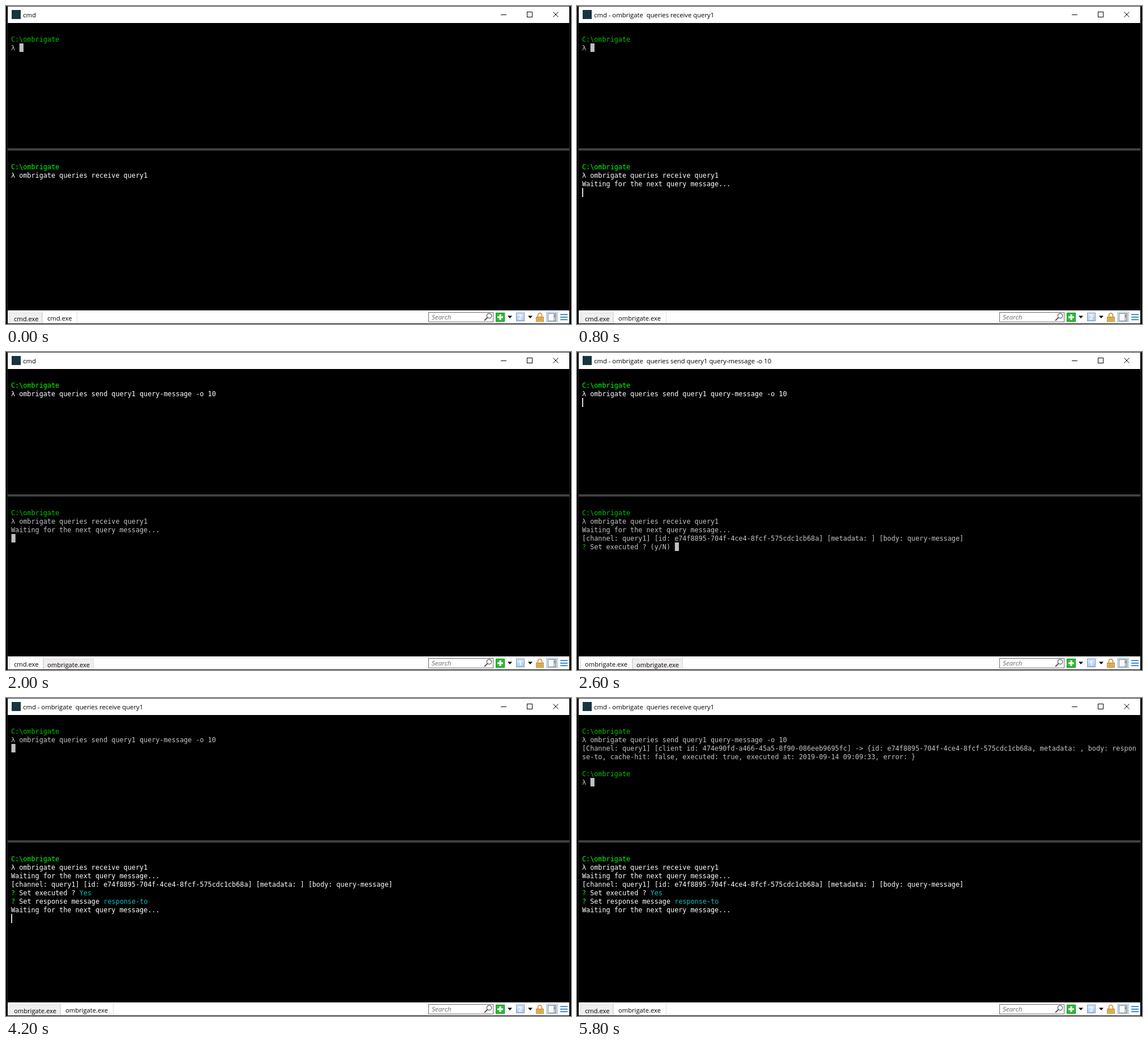
An HTML page with a canvas for the animation above (6 s loop, 998 by 561 pixels).

```html
<!DOCTYPE html>
<html lang="en">
<head>
<meta charset="utf-8">
<title>Terminal</title>
<style>
html, body { margin: 0; width: 100%; height: 100%; overflow: hidden; background: #000; }
canvas { display: block; width: 998px; height: 561px; }
</style>
</head>
<body>
<canvas id="stage" width="998" height="561"></canvas>
<script>
const ctx = document.getElementById('stage').getContext('2d');
const LOOP = 6000, CELL = 7.1, LINE = 15, LEFT = 9;
const MONO = '11.79px "DejaVu Sans Mono", monospace';
const UI = '"Open Sans", sans-serif';
const TOOL = 'ombrigate';
const ID = 'e74f8895-704f-4ce4-8fcf-575cdc1cb68a';

const PATH = [['C:\\' + TOOL, 'green']];
const SEND = 'queries send query1 query-message -o 10';
const RECEIVE = 'queries receive query1';
const WAIT = 'Waiting for the next query message...';
const sendLine = `λ ${TOOL} ${SEND}`;
const receiveLine = `λ ${TOOL} ${RECEIVE}`;
const ask = (text, answer = '') => [['?', 'green'], [` ${text} `, 'text'], [answer, 'cyan']];
const typed = (text, input) => [['?', 'green'], [` ${text} ${input}`, 'text']];

const waiting = [PATH, receiveLine, WAIT];
const received = [...waiting, `[channel: query1] [id: ${ID}] [metadata: ] [body: query-message]`];
const executed = [...received, ask('Set executed ?', 'Yes')];
const done = [PATH, sendLine,
  `[Channel: query1] [client id: 474e90fd-a466-45a5-8f90-086eeb9695fc] -> {id: ${ID}, metadata: , body: respon`,
  'se-to, cache-hit: false, executed: true, executed at: 2019-09-14 09:09:33, error: }',
  '', PATH, 'λ '];

// Each step changes part of the state; focus 0 is the upper pane.
const steps = [
  [0, { focus: 1, bar: false, top: [PATH, 'λ '], bottom: [PATH, receiveLine], topRun: '', bottomRun: '' }],
  [200, { bar: true, bottom: [PATH, receiveLine, ''], bottomRun: RECEIVE }],
  [400, { bar: false, bottom: [...waiting, ''] }],
  [800, { bar: true }],
  [1000, { focus: 0 }],
  [1200, { bar: false }],
  [1400, { bar: true, top: [PATH, 'λ clear'] }],
  [1600, { bar: false }],
  [1800, { bar: true, top: [PATH, sendLine] }],
  [2000, { bar: false }],
  [2200, { bar: true }],
  [2400, { bar: false, top: [PATH, sendLine, ''], topRun: SEND }],
  [2600, { bar: true, bottom: [...received, ask('Set executed ? (y/N)')] }],
  [2800, { bar: false }],
  [3000, { bar: true, focus: 1 }],
  [3200, { bar: false, bottom: [...received, typed('Set executed ? (y/N)', 'y')] }],
  [3400, { bar: true }],
  [3600, { bar: false, bottom: [...executed, ask('Set response message (response-to)')] }],
  [3800, { bar: true }],
  [4200, { bottom: [...executed, ask('Set response message', 'response-to'), WAIT, ''] }],
  [4400, { top: done, topRun: '' }],
  [4600, { bar: false }],
  [5000, { bar: true }],
  [5200, { bar: false }],
  [5400, { bar: true }],
  [5800, { bar: false }]
];

const bright = { text: '#fff', green: '#00ff00', cyan: '#00c4c4' };
const dim = { text: '#c4c4c4', green: '#00c000', cyan: '#009a9a' };

function box(x, y, w, h, color) {
  ctx.fillStyle = color;
  ctx.fillRect(x, y, w, h);
}

function frame(x, y, w, h, color) {
  ctx.strokeStyle = color;
  ctx.lineWidth = 1;
  ctx.strokeRect(x + .5, y + .5, w - 1, h - 1);
}

function path(points, color, width = 1) {
  ctx.beginPath();
  points.forEach(([x, y]) => ctx.lineTo(x, y));
  ctx.strokeStyle = color;
  ctx.lineWidth = width;
  ctx.stroke();
}

function label(text, x, y, font, color) {
  ctx.font = font;
  ctx.fillStyle = color;
  ctx.fillText(text, x, y);
}

function pane(lines, base, focused, bar) {
  const colors = focused ? bright : dim;
  let col = 0, y = base;
  lines.forEach((line, row) => {
    col = 0;
    y = base + row * LINE;
    for (const [text, color] of typeof line === 'string' ? [[line, 'text']] : line) {
      label(text, LEFT + col * CELL, y, MONO, colors[color]);
      col += text.length;
    }
  });
  const x = LEFT + col * CELL;
  if (!focused) box(x + .5, y - 12, 7.2, 15, '#c0c0c0');
  else if (bar) box(Math.round(x), y - 12, 2, 16, '#d8d8d8');
}

function titleBar(run) {
  box(0, 0, 998, 1, '#3c3c3c');
  box(3, 1, 992, 29, '#fff');
  box(10, 7, 16, 16, '#17343f');
  label('cmd' + (run ? ` - ${TOOL}  ${run}` : ''), 30, 20, '11.3px ' + UI, '#000');
  box(874, 15, 10, 1, '#000');
  frame(920, 10, 10, 10, '#000');
  path([[966.5, 10.5], [975.5, 19.5]], '#000');
  path([[975.5, 10.5], [966.5, 19.5]], '#000');
}

function tab(x, left, right, active, run) {
  const y = active ? 538 : 541;
  box(left, y, right - left, 560 - y, active ? '#fff' : '#f1eeee');
  path([[left + .5, 560], [left + .5, y + .5]], '#dcdcdc');
  path([[right - .5, 560], [right - .5, y + .5]], '#dcdcdc');
  if (!active) path([[left, y + .5], [right, y + .5]], '#dcdcdc');
  label((run ? TOOL : 'cmd') + '.exe', x, active ? 555 : 556, '11.2px ' + UI, '#000');
}

function tabs(s) {
  const upper = s.focus === 0;
  const x = s.topRun ? 105 : 73;
  const split = x - (upper ? 7 : 9);
  const end = x + (s.bottomRun ? 76 : 44) + (upper ? 6 : 9);
  tab(14, 6, split, upper, s.topRun);
  tab(x, split, end, !upper, s.bottomRun);
}

function arrow(x) {
  ctx.fillStyle = '#000';
  ctx.beginPath();
  ctx.moveTo(x, 546.5);
  ctx.lineTo(x + 8, 546.5);
  ctx.lineTo(x + 4, 551);
  ctx.fill();
}

function tools(focus) {
  frame(746, 540, 115, 18, '#707070');
  label('Search', 752, 553, 'italic 11.6px ' + UI, '#6b6b6b');
  ctx.beginPath();
  ctx.arc(853.5, 546.5, 4.2, 0, Math.PI * 2);
  ctx.strokeStyle = '#555';
  ctx.lineWidth = 1.2;
  ctx.stroke();
  path([[850.5, 549.5], [845, 555]], '#555', 1.8);

  box(865, 541, 16, 16, '#2dbb35');
  frame(865, 541, 16, 16, '#14921e');
  box(871.5, 544, 3, 10, '#fff');
  box(868, 547.5, 10, 3, '#fff');
  arrow(886);

  const blue = ctx.createLinearGradient(0, 541, 0, 557);
  blue.addColorStop(0, '#dfeafa');
  blue.addColorStop(1, '#a5c3e9');
  box(901, 541, 15, 15, blue);
  frame(901, 541, 15, 15, '#7599c8');
  label(focus + 1, 905, 553, 'bold 11px ' + UI, '#fff');
  arrow(922);

  ctx.beginPath();
  ctx.moveTo(939.5, 548);
  ctx.arc(943, 545.5, 3.5, Math.PI, 0);
  ctx.lineTo(946.5, 548);
  ctx.strokeStyle = '#cfa04a';
  ctx.lineWidth = 2;
  ctx.stroke();
  box(936, 548, 14, 9, '#e6bb62');
  frame(936, 548, 14, 9, '#c08d33');
  for (const y of [550, 553]) box(938, y, 10, 1, '#c08d33');

  box(954, 539, 21, 19, '#cce4f7');
  frame(954, 539, 21, 19, '#a5cdec');
  box(957, 542, 15, 14, '#fafafa');
  frame(957, 542, 15, 14, '#858585');
  box(967, 543, 4, 12, '#c6c6c6');
  box(968, 545, 2, 4, '#858585');

  for (let i = 0; i < 3; i++) box(979, 543.5 + i * 4.5, 13, 1.7, '#1874c9');
}

function draw(s) {
  box(0, 0, 998, 561, '#000');
  box(2, 30, 1, 507, '#242424');
  box(995, 30, 1, 507, '#242424');
  titleBar(s.focus ? s.bottomRun : s.topRun);
  pane(s.top, 63, s.focus === 0, s.bar);
  box(3, 251, 992, 4, '#404040');
  pane(s.bottom, 288, s.focus === 1, s.bar);
  box(3, 537, 992, 23, '#fff');
  tabs(s);
  tools(s.focus);
}

const start = performance.now();
function tick(now) {
  const t = Math.max(0, now - start) % LOOP;
  draw(Object.assign({}, ...steps.filter(([at]) => at <= t).map(([, change]) => change)));
  requestAnimationFrame(tick);
}
requestAnimationFrame(tick);
</script>
</body>
</html>
```
